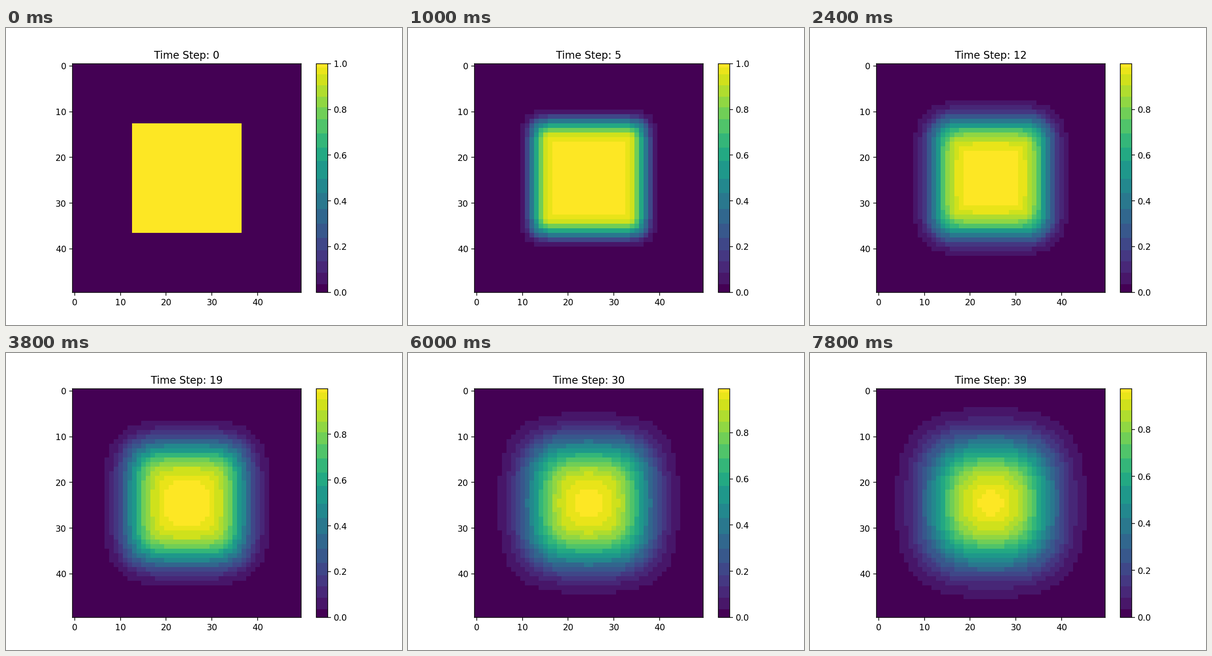
A matplotlib script that plays this animation: 864 px wide and 648 px high, repeating every 8 s.

```python
import numpy as np
import matplotlib.pyplot as plt
from matplotlib.animation import FuncAnimation
from matplotlib.colors import ListedColormap

SIZE = 50
STEPS = 40
RATE = 0.3
INTERVAL = 200

# Upper edges of the flat colour bands, as fractions of the value range
BANDS = [0.0352, 0.085, 0.138, 0.184, 0.24, 0.30, 0.363, 0.434, 0.496,
         0.573, 0.631, 0.695, 0.757, 0.81, 0.857, 0.905, 0.952, 0.985]


def banded_viridis():
    """Viridis reduced to a few flat bands."""
    edges = np.array([0, *BANDS, 1])
    tones = (edges[:-1] + edges[1:]) / 2
    tones[0], tones[-1] = 0, 1
    levels = (np.arange(256) + 0.5) / 256
    band = np.searchsorted(BANDS, levels)
    return ListedColormap(plt.get_cmap("viridis")(tones[band]))


def diffuse(u):
    """One explicit step of the nine-point heat equation, cold walls."""
    mid = u[1:-1, 1:-1]
    sides = u[:-2, 1:-1] + u[2:, 1:-1] + u[1:-1, :-2] + u[1:-1, 2:]
    corners = u[:-2, :-2] + u[:-2, 2:] + u[2:, :-2] + u[2:, 2:]
    new = u.copy()
    new[1:-1, 1:-1] = mid + RATE * (4 * sides + corners - 20 * mid) / 6
    return new


def simulate():
    x = np.linspace(0, 1, SIZE)
    inside = (x >= 0.25) & (x <= 0.75)
    states = [np.outer(inside, inside).astype(float)]
    while len(states) < STEPS:
        states.append(diffuse(states[-1]))
    return states


states = simulate()

fig, ax = plt.subplots(figsize=(6.4, 4.8), dpi=135)
image = ax.imshow(states[0], cmap=banded_viridis(), vmin=0, vmax=1)
fig.colorbar(image, ax=ax)
title = ax.set_title("Time Step: 0")


def update(step):
    heat = states[step]
    image.set_data(heat)
    image.set_clim(0, heat.max())
    title.set_text(f"Time Step: {step}")
    return image, title


anim = FuncAnimation(fig, update, frames=STEPS, interval=INTERVAL,
                     init_func=lambda: update(0), repeat=True,
                     repeat_delay=0, blit=False)
plt.show()
```
